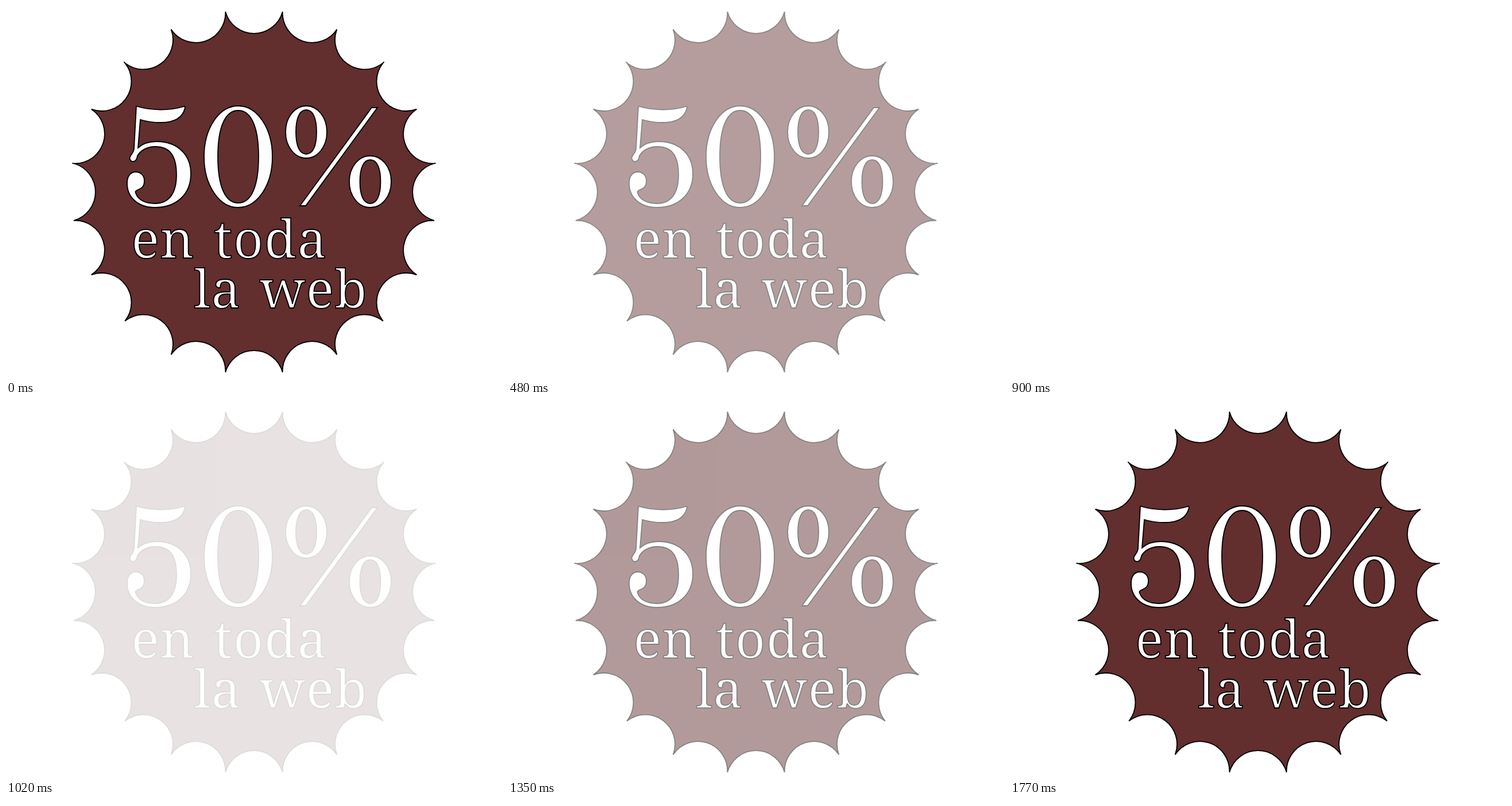
An HTML page that plays this animation: 864x648 px, repeating every 1.8 s.

```html
<!DOCTYPE html>
<html lang="es">
<head>
<meta charset="utf-8">
<title>50% en toda la web</title>
<style>
  html, body { margin: 0; width: 100%; height: 100%; overflow: hidden; background: #fff; }
  svg { display: block; width: 100vw; height: 100vh; }
  #badge { fill: #fff; stroke: #000; stroke-width: 1.8; }
  #burst { fill: #622e2e; }
  #digits { fill-rule: evenodd; }
  text { font: 92px "Noto Serif", serif; letter-spacing: 1px; }
</style>
</head>
<body>
<svg viewBox="0 0 864 648">
  <g id="badge">
    <path id="burst"/>
    <g id="digits" role="img" aria-label="50%">
      <path d="M227 174.5C252 182 284 183 310 175Q312 175 312 177C308 194 294 203 270 203
        Q250 203 234 198L230 247C239 239 249 236 262 236C300 236 322 260 322 292
        C322 328 297 351 259 351C230 351 211 333 211 309C211 296 217 289 226 289
        C235 289 241 296 241 304C241 313 238 317 230 320C225 322 225 324 226 326
        C230 338 243 344 259 344C285 344 297 325 297 294C297 260 285 245 260 245
        C245 245 234 252 229 261C228 268 225 271 221 271C218 271 215.5 268 215.5 265
        C215.5 260 222 257 223 249Z"/>
      <path id="zero"/>
      <path id="percent"/>
    </g>
    <text x="218" y="439">en</text>
    <text x="362" y="439">toda</text>
    <text x="327.5" y="525.5">la</text>
    <text x="442" y="525.5">web</text>
  </g>
</svg>
<script>
const byId = id => document.getElementById(id);
const draw = (id, d) => byId(id).setAttribute('d', d);

// Scalloped badge: points joined by inward arcs.
function burst(points, radius, scallop) {
  const at = (i, r) => {
    const a = (i + 0.5) * 2 * Math.PI / points;
    return `${(432 + r * Math.sin(a)).toFixed(2)} ${(324 - r * Math.cos(a)).toFixed(2)}`;
  };
  const longTips = [2, 4, 15, 17];
  let d = `M${at(-1, radius)}`;
  for (let i = 0; i < points; i++) {
    d += `A${scallop} ${scallop} 0 0 0 ${at(i, radius)}`;
    if (longTips.includes(i)) d += `L${at(i, radius + 2.5)}L${at(i, radius)}`;
  }
  return d + 'Z';
}

// Closed oval; k sets how square its shoulders are.
function oval(cx, cy, rx, ry, k) {
  const hx = rx * k, hy = ry * k;
  return `M${cx} ${cy - ry}` +
    `C${cx + hx} ${cy - ry} ${cx + rx} ${cy - hy} ${cx + rx} ${cy}` +
    `C${cx + rx} ${cy + hy} ${cx + hx} ${cy + ry} ${cx} ${cy + ry}` +
    `C${cx - hx} ${cy + ry} ${cx - rx} ${cy + hy} ${cx - rx} ${cy}` +
    `C${cx - rx} ${cy - hy} ${cx - hx} ${cy - ry} ${cx} ${cy - ry}Z`;
}

const ring = (cx, cy, rx, ry, ix, iy) =>
  oval(cx, cy, rx, ry, 0.56) + oval(cx, cy, ix, iy, 0.64);

draw('burst', burst(20, 318, 51.6));
draw('zero', ring(404.5, 262.5, 59.5, 88.5, 35.5, 80.5));
draw('percent', ring(523, 219.5, 36, 45.5, 18, 38.5) +
  ring(634.5, 306, 36.5, 45, 18, 38) + 'M637 177H647L522 348H512Z');

// Time in ms, opacity, number of held steps up to the next row.
const LOOP = 1800;
const fade = [
  [0, 1, 10],
  [300, 2 / 3, 10],
  [900, 0, 9],
  [1440, 18 / 29, 11],
  [1770, 1, 1],
  [LOOP, 1, 1]
];
byId('badge').animate(
  fade.map(([time, opacity, n]) => ({ offset: time / LOOP, opacity, easing: `steps(${n})` })),
  { duration: LOOP, iterations: Infinity }
);
</script>
</body>
</html>
```
